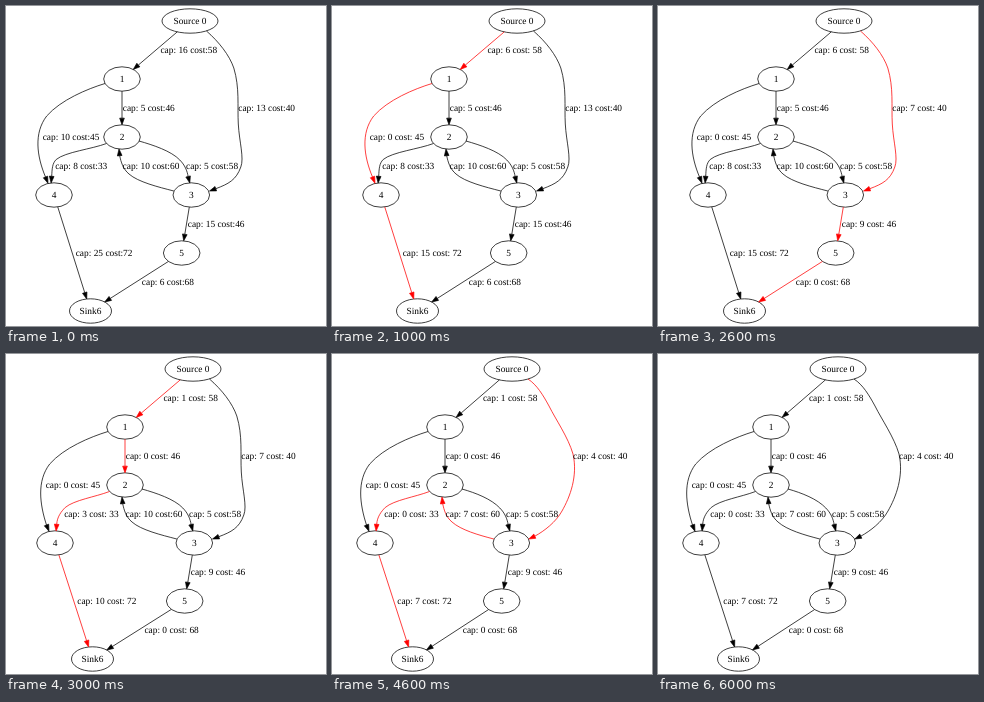
An HTML page for the animation above (7 s loop, 320x320 px).

```html
<!DOCTYPE html>
<html lang="en">
<head>
<meta charset="utf-8">
<title>Min-cost flow</title>
<style>
  html, body { margin: 0; width: 100%; height: 100%; overflow: hidden; background: #fff; }
  svg { display: block; width: 100vw; height: 100vh; }
  text { font: 9.4px "Liberation Serif", Times, serif; text-rendering: geometricPrecision; }
  .line { fill: none; stroke: #000; stroke-width: .75; }
  .head { stroke: #000; stroke-width: .67; }
  .hot .line, .hot .head { stroke: #f00; }
  .hot .head { fill: #f00; }
  .step { visibility: hidden; animation: show 7s step-end infinite; }
  @keyframes show {
    0% { visibility: visible; }
    14.2857%, 100% { visibility: hidden; }
  }
</style>
</head>
<body>
<svg id="stage" viewBox="0 0 320 320"></svg>
<script>
const HEAD = 6.67, RY = 12.2;
const nodes = [
  { name: 'Source 0', rank: 0, rx: 28 },
  { name: '1', rank: 1 },
  { name: '2', rank: 2 },
  { name: '3', rank: 3 },
  { name: '4', rank: 3 },
  { name: '5', rank: 4 },
  { name: 'Sink6', rank: 5, rx: 21 }
];

const edges = {
  a: { from: 0, to: 1, cap: 16, cost: 58 },
  b: { from: 1, to: 2, cap: 5, cost: 46 },
  c: { from: 0, to: 3, cap: 13, cost: 40 },
  d: { from: 1, to: 4, cap: 10, cost: 45 },
  e: { from: 2, to: 4, cap: 8, cost: 33 },
  f: { from: 3, to: 2, cap: 10, cost: 60 },
  g: { from: 2, to: 3, cap: 5, cost: 58 },
  h: { from: 3, to: 5, cap: 15, cost: 46 },
  i: { from: 4, to: 6, cap: 25, cost: 72 },
  j: { from: 5, to: 6, cap: 6, cost: 68 }
};

// highlighted edges and the flow pushed along them
const steps = [['', 0], ['adi', 10], ['chj', 6], ['abei', 5], ['cfei', 3], ['dej', 0], ['', 0]];

// The drawing drifts right until a shorter label on f narrows it;
// a longer label on e widens the left side.
function layout(n) {
  const narrow = !!edges.f.used, wideLeft = !!edges.e.used;
  const source = narrow ? 180 : 184 + n;
  const mid = narrow ? 113 : 116 + n;
  const left = mid - (wideLeft ? 70 : 68);
  const right = mid + (narrow ? 66.3 : 69.3);
  return {
    narrow,
    x: [source, mid, mid, right, left, right - 9.6, (mid + left) / 2 + 2.5],
    label: {
      c: source + (narrow ? 61 : 48.3),
      d: mid - 79.3,
      e: left + (wideLeft ? 9.2 : 1.2),
      f: mid + .6,
      g: right - 5.3
    }
  };
}

// each curve returns [path start, last shaft point, arrow tip]
const curves = {
  c: (s, n, L, narrow) => narrow
    ? [`M${s + 16},25C${s + 25},31 ${s + 31},41 ${s + 37},52C${L - 17},66 ${L - 5},83 ${L},100C${L + 5},122 ${L - 3},143 ${L - 11},157C${L - 17},168 ${n + 33},177`,
      [n + 23.5, 182.2], [n + 17.5, 185]]
    : [`M${s + 16.5},25C${s + 29},36 ${L - 9},49 ${L - 4.5},62C${L + 1.5},82 ${L - 1},100 ${L},118C${L + 1},136 ${L + 6},152 ${L + 2.5},161C${L - 2},174 ${n + 37},178`,
      [n + 24.5, 182.7], [n + 18.2, 185]],
  d: (s, n, L) => [`M${s - 17},77.5C${s - 35},83 ${L + 18},94 ${L + 4},110C${L - 9},127 ${L - 6},150`,
    [n - 8.5, 171], [n - 6, 177.3]],
  e: (s, n, L) => {
    const x = n + (L - n) / 2 - 3.5;
    return [`M${s - 15.5},137.5C${s - 30},143 ${L + 10},146 ${L + 1},153.5C${L - 3},157.5 ${x + 1},163`,
      [x + .6, 170.3], [x, 177]];
  },
  f: (s, n) => [`M${s - 17.5},185C${s - 33},181 ${n + 16},176 ${n + 7},168C${n + 1},163 ${n - 1},156`,
    [n - 2.3, 149.7], [n - 3, 143]],
  g: (s, n) => [`M${s + 17},135C${s + 31},139 ${n - 20},145 ${n - 11.5},154C${n - 6.5},159 ${n - 4},165`,
    [n - 3.2, 170.5], [n - 1.5, 177]]
};

const pt = p => p.map(v => v.toFixed(2)).join();
const rankY = k => 15 + 58 * nodes[k].rank;
const radius = k => nodes[k].rx || 18.3;

function straight(x, from, to) {
  const dx = x[to] - x[from], dy = rankY(to) - rankY(from), len = Math.hypot(dx, dy);
  const rim = k => 1 / Math.hypot(dx / radius(k), dy / RY);
  const at = t => [x[from] + dx * t, rankY(from) + dy * t];
  const end = 1 - rim(to);
  return [`M${pt(at(rim(from)))}L`, at(end - HEAD / len), at(end)];
}

// labels of straight edges sit just right of the middle
function besideMiddle(x, from, to) {
  const dx = Math.abs(x[to] - x[from]), dy = rankY(to) - rankY(from);
  return (x[from] + x[to]) / 2 + .055 * dx + .0125 * dy;
}

function arrow([start, base, tip]) {
  const dx = tip[0] - base[0], dy = tip[1] - base[1];
  const k = 2.33 / Math.hypot(dx, dy);
  const left = [base[0] - dy * k, base[1] + dx * k];
  const right = [base[0] + dy * k, base[1] - dx * k];
  return `<path class="line" d="${start} ${pt(base)}"/>` +
    `<path class="head" d="M${pt(left)}L${pt(tip)}L${pt(right)}Z"/>`;
}

function drawNode(node, k, x) {
  return `<ellipse class="line" cx="${x}" cy="${rankY(k)}" rx="${radius(k)}" ry="${RY}"/>` +
    `<text x="${x}" y="${rankY(k) + 3}" text-anchor="middle">${node.name}</text>`;
}

function drawEdge(key, hot, { x, label, narrow }) {
  const { from, to, cap, cost, used } = edges[key];
  const shape = curves[key]
    ? curves[key](x[from], x[to], label[key], narrow)
    : straight(x, from, to);
  const textX = label[key] || besideMiddle(x, from, to);
  const textY = (rankY(from) + rankY(to)) / 2 + 3;
  return `<g class="${hot ? 'hot' : ''}">${arrow(shape)}</g>` +
    `<text x="${textX}" y="${textY}">cap: ${cap} cost:${used ? ' ' : ''}${cost}</text>`;
}

stage.innerHTML = steps.map(([hot, flow], n) => {
  if (flow) for (const key of hot) {
    edges[key].cap -= flow;
    edges[key].used = true;
  }
  const plan = layout(n);
  const out = nodes.map((node, k) => drawNode(node, k, plan.x[k])).join('') +
    Object.keys(edges).map(key => drawEdge(key, hot.includes(key), plan)).join('');
  return `<g class="step" style="animation-delay:${n - steps.length}s">${out}</g>`;
}).join('');
</script>
</body>
</html>
```
